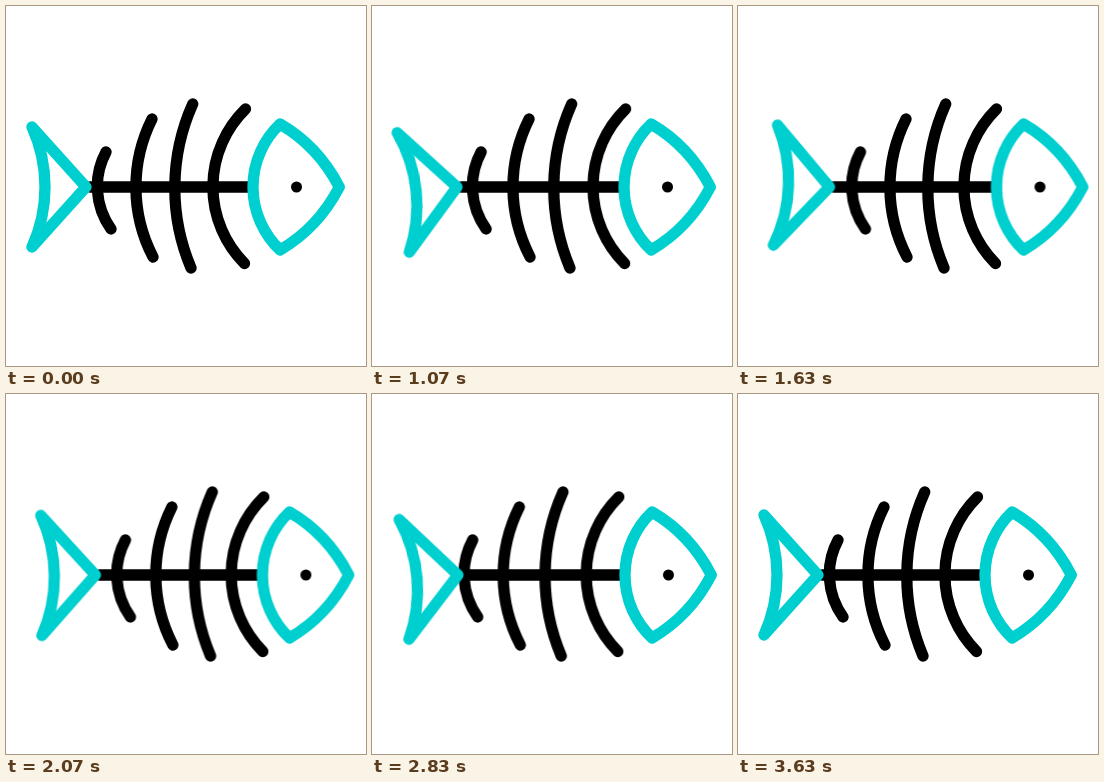
Animation of 360 by 360 pixels, one loop 4 s. Source, as an HTML page:

```html
<!DOCTYPE html>
<html lang="en">
<head>
<meta charset="utf-8">
<title>Swimming fishbone</title>
<style>
  html, body { margin: 0; height: 100%; overflow: hidden; background: #fff; }
  svg { display: block; width: 100%; height: 100%; }

  path { fill: none; stroke-width: 11.3; stroke-linecap: round; stroke-linejoin: round; }
  .bone { stroke: #000; }
  .skin { stroke: #00cfcf; }

  .rib, .body, .tail {
    animation: 4s cubic-bezier(.37, 0, .63, 1) var(--lag, 86ms) infinite;
  }
  .rib { animation-name: rib; }
  .body { animation-name: swim; }
  .tail { animation-name: wag; transform-origin: 80px 181px; }
  .eye { animation: blink 4s ease-in-out infinite; transform-origin: 290.5px 181px; }

  /* ribs ripple from the head towards the tail */
  .r1 { --lag: 0ms;  --dip: -12px;  --lo: 7px;   --hi: 19px; }
  .r2 { --lag: 12ms; --dip: -8.4px; --lo: 4.1px; --hi: 21.3px; }
  .r3 { --lag: 21ms; --dip: -5.3px; --lo: 1.3px; --hi: 22.9px; }
  .r4 { --lag: 35ms; --dip: -2.7px; --lo: .5px;  --hi: 24.5px; }

  @keyframes rib {
    0%, 86%, 100% { transform: translateX(0); }
    9.7% { transform: translateX(var(--dip)); }
    17.68%, 29.35%, 41.02%, 52.69%, 64.36%, 76.03% { transform: translateX(var(--hi)); }
    23.51%, 35.18%, 46.85%, 58.52%, 70.19% { transform: translateX(var(--lo)); }
  }
  @keyframes swim {
    0%, 88.6%, 100% { transform: translateX(0); }
    9.7% { transform: translateX(-11.7px); }
    17.68%, 29.35%, 41.02%, 52.69%, 64.36%, 76.03% { transform: translateX(15.7px); }
    23.51%, 35.18%, 46.85%, 58.52%, 70.19% { transform: translateX(4px); }
  }
  @keyframes wag {
    0%, 88.6%, 100% { transform: rotate(0deg); }
    9.7% { transform: rotate(2.3deg); }
    17.68%, 29.35%, 41.02%, 52.69%, 64.36%, 76.03% { transform: rotate(7deg); }
    23.51%, 35.18%, 46.85%, 58.52%, 70.19% { transform: rotate(-7deg); }
  }
  @keyframes blink {
    0%, 10.75%, 17.5%, 100% { transform: scaleY(1); }
    14.25% { transform: scaleY(.3); }
  }
</style>
</head>
<body>
<svg viewBox="0 0 360 360">
  <g class="bone">
    <path class="rib r1" d="M239.5 103A109 109 0 0 0 238.5 257.5"/>
    <path class="rib r2" d="M186.7 98A206 206 0 0 0 185 262"/>
    <path class="rib r3" d="M146 113A152 152 0 0 0 147 251"/>
    <path class="rib r4" d="M100 146A73 73 0 0 0 105 223"/>
  </g>
  <g class="body">
    <path class="bone" d="M84 181H246"/>
    <path class="skin tail" d="M26 121L80 181L26 241A145 145 0 0 0 26 121Z"/>
    <path class="skin" d="M274 118Q312 140 333.3 181Q312 222 274 244A87 87 0 0 1 274 118Z"/>
    <circle class="eye" cx="290.5" cy="181" r="5.5"/>
  </g>
</svg>
</body>
</html>
```
